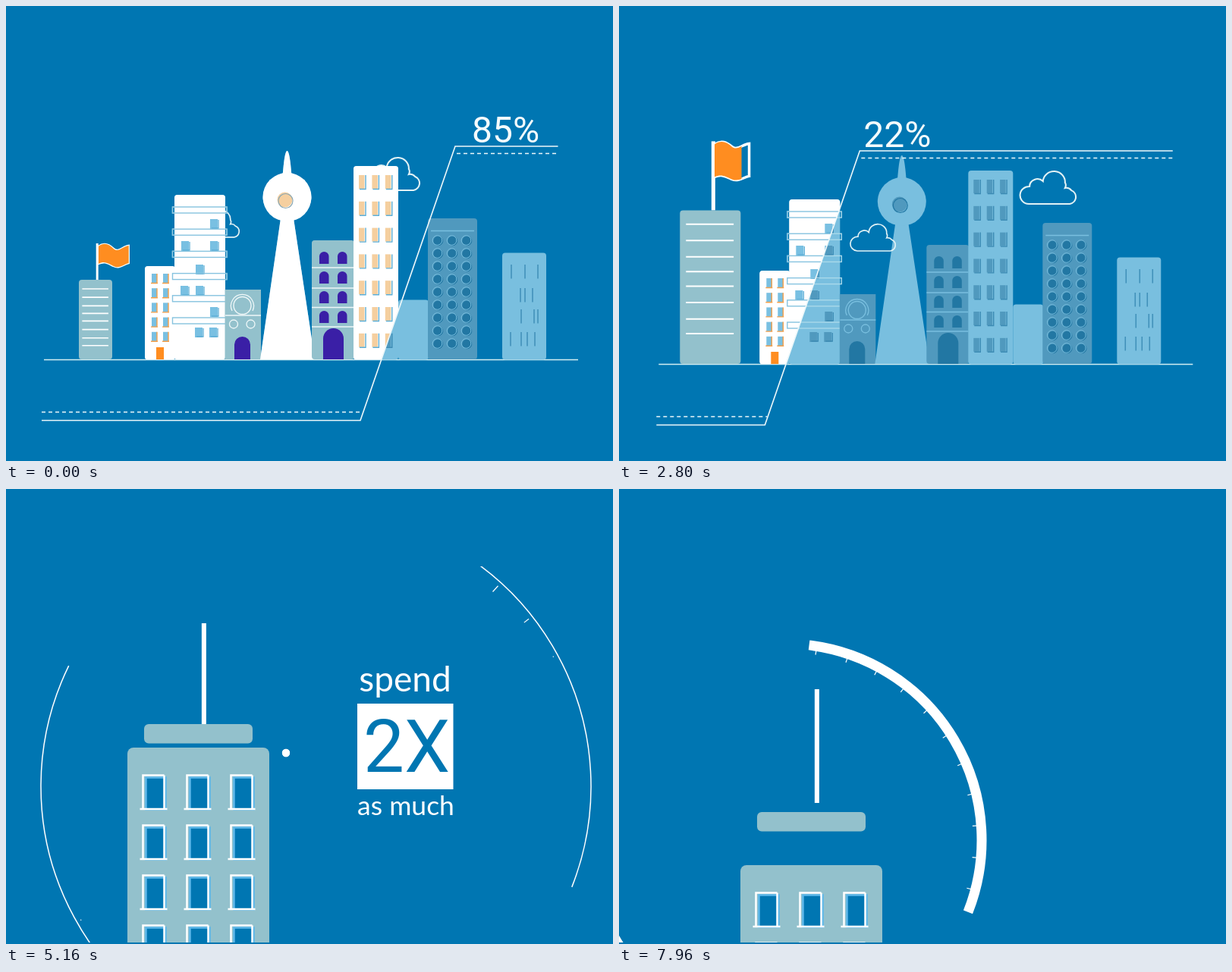
Recreate the animation shown at these times as an HTML page. Size 800 by 600 pixels, loop 8 s.

```html
<!DOCTYPE html>
<html lang="en">
<head>
<meta charset="utf-8">
<title>City share</title>
<style>
  html, body { margin: 0; width: 100%; height: 100%; overflow: hidden; background: #0076b2; }
  svg { display: block; width: 800px; height: 600px; }
  .percent { font: 400 48px Roboto, sans-serif; }
  .words { font-family: Lato, sans-serif; }
  .factor { font: 400 96px Roboto, sans-serif; }
</style>
</head>
<body>
<svg viewBox="0 0 800 600">
  <defs>
    <clipPath id="stageClip"><rect y="102" width="800" height="496"/></clipPath>
    <clipPath id="shareClip"><polygon id="share"/></clipPath>
    <clipPath id="flagClip"><rect id="flagWipe" y="-20" height="90"/></clipPath>
    <path id="cloud" fill="none" stroke="#e2f2f5" stroke-width="2"
      d="M12 45A11.5 11.5 0 0 1 13 22A10 10 0 0 1 30 15A14 14 0 0 1 58 17Q60 20 58 24A8 8 0 0 1 66 27A9.5 9.5 0 0 1 64 45Z"/>
  </defs>
  <g clip-path="url(#stageClip)">
    <g id="city">
      <path d="M50 466.5H754" stroke="#d3edf1" stroke-width="1.6"/>
      <g id="pale"></g>
      <g id="clouds">
        <use href="#cloud" transform="translate(247 268) scale(.84 .82)"/>
        <use href="#cloud" transform="translate(470.5 198) scale(1.04 1)"/>
      </g>
      <g clip-path="url(#shareClip)"><g id="vivid"></g></g>
      <g fill="none" stroke="#eef8fa" stroke-width="1.6">
        <path id="slider" pathLength="1"/>
        <path id="dashLow" stroke-dasharray="5 4"/>
        <path id="dashHigh" stroke-dasharray="5 4"/>
      </g>
    </g>
    <text id="percent" class="percent" fill="#f4fbfc"></text>

    <rect id="pole" fill="#fff"/>
    <g id="flag">
      <path id="flagBack" fill="none" stroke="#fff" stroke-width="3"/>
      <path id="flagFill" fill="#ff8d20" clip-path="url(#flagClip)"/>
    </g>
    <rect id="cap" x="182" width="143" rx="6" fill="#93c1cc"/>
    <rect id="block" fill="#93c1cc"/>
    <path id="stripes" fill="none" stroke="#fff"/>
    <g id="windows" fill="none" stroke="#fff" stroke-width="2.5"></g>

    <g id="dial" fill="none" stroke="#fff">
      <path id="arcR"/><path id="arcL"/><path id="ticks" stroke-width="1.2"/>
    </g>
    <g id="gauge" fill="#fff">
      <path id="gaugeLine" stroke="#fff" stroke-width="1.2" stroke-dasharray="4 4"/>
      <circle id="dotTop" cx="369" cy="348"/><circle id="dotEnd" cx="369"/>
    </g>
    <g id="message" fill="#fff" text-anchor="middle">
      <text id="spend" class="words" x="526" y="267" font-size="46">spend</text>
      <g id="panel">
        <rect x="463" y="283" width="126.5" height="113"/>
        <path id="slats" stroke="#0076b2"/>
        <text class="factor" x="528" y="373" fill="#0076b2">2X</text>
      </g>
      <text id="much" class="words" x="527" y="430" font-size="35.5">as much</text>
    </g>
  </g>
</svg>
<script>
const LOOP = 8000;
const el = {};
document.querySelectorAll('[id]').forEach(n => el[n.id] = n);
const set = (id, attrs) => { for (const k in attrs) el[id].setAttribute(k, attrs[k]); };
const clamp = x => Math.max(0, Math.min(1, x));
const span = (t, a, b) => clamp((t - a) / (b - a));
const ease = (t, a, b) => { const x = span(t, a, b); return x < .5 ? 4 * x ** 3 : 1 - 4 * (1 - x) ** 3; };
const sine = (t, a, b) => .5 - .5 * Math.cos(Math.PI * span(t, a, b));
const mix = (a, b, p) => a + (b - a) * p;
const steps = (t, table) => {
  let [t0, v0] = table[0];
  for (const [t1, v1] of table) {
    if (t < t1) return mix(v0, v1, span(t, t0, t1));
    t0 = t1; v0 = v1;
  }
  return v0;
};
const count = (n, f) => Array.from({ length: n }, (_, i) => f(i)).join('');

// Skyline, drawn once per palette
const palettes = {
  vivid: { tall: '#fff', mid: '#93c1cc', line: '#eef7f8', door: '#3a1fa6', pane: '#79c0e2', paneEdge: '#5caed6',
    frame: '#f5a04a', gate: '#ff8d20', glow: '#f5cf9f', bar: '#86c3df', glowEdge: '#8ba9b5' },
  pale: { tall: '#79bfdf', mid: '#5099be', line: '#79bfdf', door: '#2277a3', pane: '#5099be', paneEdge: '#3c8bb4',
    frame: '#5099be', gate: '#5099be', glow: '#5099be', bar: '#a9d9ea', glowEdge: '#2277a3' }
};
const box = (x, y, w, h, fill, r = 0, more = '') =>
  `<rect x="${x}" y="${y}" width="${w}" height="${h}" rx="${r}" fill="${fill}" ${more}/>`;
const ring = (x, y, r, stroke, w = 1.3, fill = 'none') =>
  `<circle cx="${x}" cy="${y}" r="${r}" fill="${fill}" stroke="${stroke}" stroke-width="${w}"/>`;
const arch = (x, y, w, h, fill) =>
  `<path d="M${x} ${y + h}V${y + w / 2}a${w / 2} ${w / 2} 0 0 1 ${w} 0V${y + h}Z" fill="${fill}"/>`;
const stroke = (d, color, w = 1.3) => `<path d="${d}" fill="none" stroke="${color}" stroke-width="${w}"/>`;

function skyline(c) {
  const panes = [[269, 281], [231, 310], [269, 310], [250, 341], [230, 369], [250, 369], [269, 397], [249, 424], [268, 424]];
  return box(183, 343, 40, 123.5, c.tall, 4)
    + count(10, i => {
      const x = 192 + 15 * (i % 2), y = 353 + 19.2 * (i >> 1);
      return box(x, y, 7, 12.5, c.pane) + stroke(`M${x - 1} ${y + 12.5}h9M${x + 7} ${y}v12.5`, c.frame, 1.4);
    })
    + box(198, 450, 10, 16, c.gate)
    + box(222, 249, 67, 217.5, c.tall, 4)
    + panes.map(([x, y]) => box(x, y, 10, 13, c.pane) + stroke(`M${x + 2} ${y + 12}h9V${y + 1}`, c.paneEdge)).join('')
    + count(6, i => box(219.5, 265 + 29.2 * i, 71.5, 8, 'none', 0, `stroke="${c.bar}" stroke-width="1.4"`))
    + box(288.5, 374, 47.5, 92, c.mid)
    + stroke('M289 408H336', c.line)
    + ring(311.5, 395, 11.5, c.line, 1.4, c.mid) + stroke('M298 402A15 15 0 1 1 325 402', c.line)
    + ring(300, 419.5, 5.5, c.line) + ring(322.5, 419.5, 5.5, c.line)
    + arch(301, 436, 21, 30, c.door)
    + `<path d="M364.5 225Q367 191 370.5 191Q374 191 376.5 225ZM362 280H379L407 466H335Z" fill="${c.tall}"/>`
    + ring(370.5, 252, 32, 'none', 0, c.tall)
    + ring(367.5, 255.5, 10, 'none', 0, c.glow) + ring(368.5, 257, 9.5, c.glowEdge, 1.2)
    + box(403, 309, 56, 157, c.mid, 4)
    + stroke('M403 345H458M403 372H458M403 397.5H458M403 423H458', c.line)
    + count(8, i => arch(413 + 24 * (i % 2), 324 + 26 * (i >> 1), 12.5, 16, c.door))
    + arch(418, 425, 27, 41, c.door)
    + box(458, 211, 59, 255.5, c.tall, 4)
    + count(21, i => {
      const x = 465 + 17.4 * (i % 3), y = 223 + 34.8 * Math.floor(i / 3);
      return box(x, y, 7.5, 18, c.glow) + stroke(`M${x + 1} ${y + 18.5}h8V${y}`, c.paneEdge, 1.4);
    });
}
const district = box(517, 387.5, 40, 79, '#79bfdf', 4)
  + box(556, 280, 65, 186, '#5099be', 4) + stroke('M560 296.5H617', '#79bfdf')
  + count(27, i => {
    const x = 569 + 19 * (i % 3), y = 309 + 17 * Math.floor(i / 3);
    return ring(x + .7, y + .8, 6, '#2277a3', 1, '#2277a3') + ring(x - .5, y, 6.3, '#79bfdf', 1);
  })
  + box(654, 325.5, 58, 141, '#79bfdf', 4)
  + [[341, 666, 684, 701], [372, 678, 684, 694], [400, 679, 696, 701], [430, 665, 679, 687, 697]]
    .map(([y, ...xs]) => stroke(xs.map(x => `M${x} ${y}v18.5`).join(''), '#3f8fb8', 1.5)).join('');
el.pale.innerHTML = district + skyline(palettes.pale);
el.vivid.innerHTML = skyline(palettes.vivid);

el.windows.innerHTML = count(12, i => {
  const x = 20.5 + 58 * (i % 3), y = 36.5 + 66 * Math.floor(i / 3);
  return `<g transform="translate(${x} ${y})">
    <rect class="pane" x="4" y="3" width="26" height="42" fill="#0076b2" stroke="#5db8ea"/>
    <path class="side" pathLength="1" d="M28 0V44"/>
    <path class="frame" pathLength="1" d="M28 0H0V44"/>
    <path class="sill" pathLength="1" d="M-4 44.5H32"/></g>`;
});
const parts = ['pane', 'side', 'frame', 'sill'].map(k => [k, [...el.windows.querySelectorAll('.' + k)]]);
const slatRows = [287, 291, 306, 322, 341, 349, 360, 364, 368, 374, 378, 382, 385, 388, 390];
set('slats', { d: slatRows.map(y => `M463 ${y}h126.5`).join('') });

const flagPath = (w, h) => `M0 2C${.2 * w} -4 ${.35 * w} -1 ${.5 * w} 5S${.8 * w} 2 ${w} 1`
  + `V${h}C${.85 * w} ${h + 1} ${.7 * w} ${h + 8} ${.5 * w} ${h + 4}S${.2 * w} ${h - 3} 0 ${h + 1}Z`;
const polar = (r, deg) => [r * Math.cos(deg * Math.PI / 180), r * Math.sin(deg * Math.PI / 180)].map(v => v.toFixed(2)).join(' ');
const arc = (r, a, b) => b - a < .1 ? '' : `M${polar(r, a)}A${r} ${r} 0 0 1 ${polar(r, b)}`;

function drawCity(t) {
  const px = 135.5 * ease(t, 2720, 3220), py = 420 * ease(t, 2700, 3360);
  const visibility = t < 3500 ? 'visible' : 'hidden';
  set('city', { transform: `translate(${px} ${py})`, visibility });
  set('clouds', { transform: `translate(${t * .0179 + 2 * px} ${2 * py})` });

  const x = 467 - 277 * ease(t, 0, 2620), top = x + 125;
  set('share', { points: `0,0 ${x + 189},0 ${x - 19},600 0,600` });
  const gone = ease(t, 2820, 3230);
  set('slider', { d: `M47 546.5H${x}L${top} 185H727.5`, 'stroke-dasharray': '1 1', 'stroke-dashoffset': -gone,
    'stroke-opacity': gone > .995 ? 0 : 1 });
  set('dashLow', { d: `M${mix(47, x + 3, gone)} 535.5H${x + 3}` });
  set('dashHigh', { d: `M${mix(top + 2, 727.5, ease(t, 2850, 3464))} 194.5H727.5` });

  const p = ease(t, 469, 2600);
  el.percent.textContent = Math.round(85 - 63 * p) + '%';
  set('percent', { x: 614 - 294 * p + px, y: 179.5 + py + 40 * ease(t, 2820, 3300), visibility });
  return [px, py];
}

function drawTower(t, px, py) {
  const out = span(t, 7620, 7960) ** 2;
  const w = 44 + 143 * ease(t, 2415, 3385), h = 105 + 440 * ease(t, 2374, 3494);
  const cx = 118 + px, left = cx - w / 2, base = 466 + py, top = base - h + 155 * out;
  const capUp = ease(t, 3550, 3900);
  set('block', { x: left, y: top, width: w, height: h, rx: Math.max(4, w * .043) });
  set('cap', { y: mix(base - h, 310, capUp) + 116 * out, height: 25.5 * capUp, visibility: capUp > 0 ? 'visible' : 'hidden' });

  const poleH = steps(t, [[2400, 48], [2800, 91], [3200, 130], [3500, 133]]) + 17 * out;
  const poleW = steps(t, [[2400, 3], [2800, 5], [3200, 7], [3600, 7], [3900, 6]]);
  const poleX = cx + w * .05 - 2 * capUp, foot = mix(base - h, 310, capUp) + 104 * out;
  set('pole', { x: poleX - poleW / 2, y: foot - poleH, width: poleW, height: poleH });

  const fw = steps(t, [[2400, 40], [2800, 46], [2980, 0]]), fh = steps(t, [[2400, 24], [2800, 44]]);
  const d = flagPath(fw, fh);
  set('flag', { transform: `translate(${poleX + 1.5} ${foot - poleH + 2})`, visibility: fw > 0 ? 'visible' : 'hidden' });
  set('flagBack', { d, 'stroke-width': steps(t, [[2400, 2.5], [2800, 3.5]]) });
  set('flagFill', { d });
  set('flagWipe', { width: steps(t, [[2600, 46], [2800, 36], [2920, 0]]) });

  // Stripes sit slightly lower in the middle of each group of four
  const shrink = 1 - ease(t, 3210, 3460), reach = w * .785 * shrink;
  const stripeY = i => top + 5.3 + h * (.0636 + .101 * i + .0055 * (2 - Math.abs(i % 4 - 2)));
  set('stripes', { d: count(8, i => `M${left + w * .1} ${stripeY(i)}h${reach}`),
    'stroke-width': Math.min(3, 1.2 + w / 100), visibility: shrink > 0 ? 'visible' : 'hidden' });

  set('windows', { transform: `translate(${left} ${top}) scale(${w / 187})`, visibility: t > 3020 ? 'visible' : 'hidden' });
  const shown = { pane: ease(t, 3380, 3620), side: span(t, 3030, 3238), sill: span(t, 3125, 3415), frame: ease(t, 3230, 3520) };
  for (const [kind, nodes] of parts) for (const n of nodes) {
    const p = shown[kind];
    if (kind === 'pane') n.style.opacity = p;
    else {
      n.style.strokeDasharray = `${p} 2`;
      n.style.visibility = p > 0 ? 'inherit' : 'hidden';
    }
  }
}

function drawDial(t) {
  const out = ease(t, 7580, 7960);
  const scale = mix(1, .7145, out), r = 362.5 * scale, width = mix(1.5, 13, out);
  set('dial', { transform: `translate(${mix(408.5, 219, out)} ${mix(392, 463, out)})`, visibility: t > 3690 ? 'visible' : 'hidden' });
  set('arcR', { d: arc(r, -83, -83 + 104.5 * sine(t, 3694, 4630)), 'stroke-width': width });
  set('arcL', { d: arc(r, 97, 97 + 109 * sine(t, 3690, 4735)), 'stroke-width': width });
  const tick = (deg, i) => {
    const p = ease(t, 4800 + 60 * i, 5000 + 60 * i);
    return p > 0 ? `M${polar(357 * scale, deg)}L${polar((357 - 10.5 * p) * scale, deg)}` : '';
  };
  set('ticks', { d: count(11, i => tick(9.55 * (i - 8) - 4.3 * out, i) + tick(102.6 + 9.55 * i + 2.1 * out, i)) });
}

function drawMessage(t) {
  const slide = 1 - ease(t, 4069, 4661), out = ease(t, 7600, 7860);
  set('message', { opacity: 1 - out });
  set('spend', { transform: `translate(${160 * (slide + out)} 0)`, opacity: span(t, 4069, 4160) });
  set('much', { transform: `translate(${-129 * (slide + out)} 0)`, opacity: span(t, 4069, 4160) });
  set('panel', { visibility: t > 3900 ? 'visible' : 'hidden' });
  set('slats', { 'stroke-width': 16 * (1 - ease(t, 3900, 4500)) });

  const back = 1 - ease(t, 7580, 7820);
  const end = 348 + 224 * ease(t, 5200, 5900) * back, dot = 6 * ease(t, 5000, 5240) * back;
  set('gauge', { visibility: dot > 0 ? 'visible' : 'hidden' });
  set('gaugeLine', { d: `M369 348V${end}` });
  set('dotTop', { r: dot });
  set('dotEnd', { cy: end, r: dot });
}

function draw(t) {
  const [px, py] = drawCity(t);
  drawTower(t, px, py);
  drawDial(t);
  drawMessage(t);
}

const start = performance.now();
function tick(now) {
  draw(Math.max(0, now - start) % LOOP);
  requestAnimationFrame(tick);
}
draw(0);
requestAnimationFrame(tick);
</script>
</body>
</html>
```
